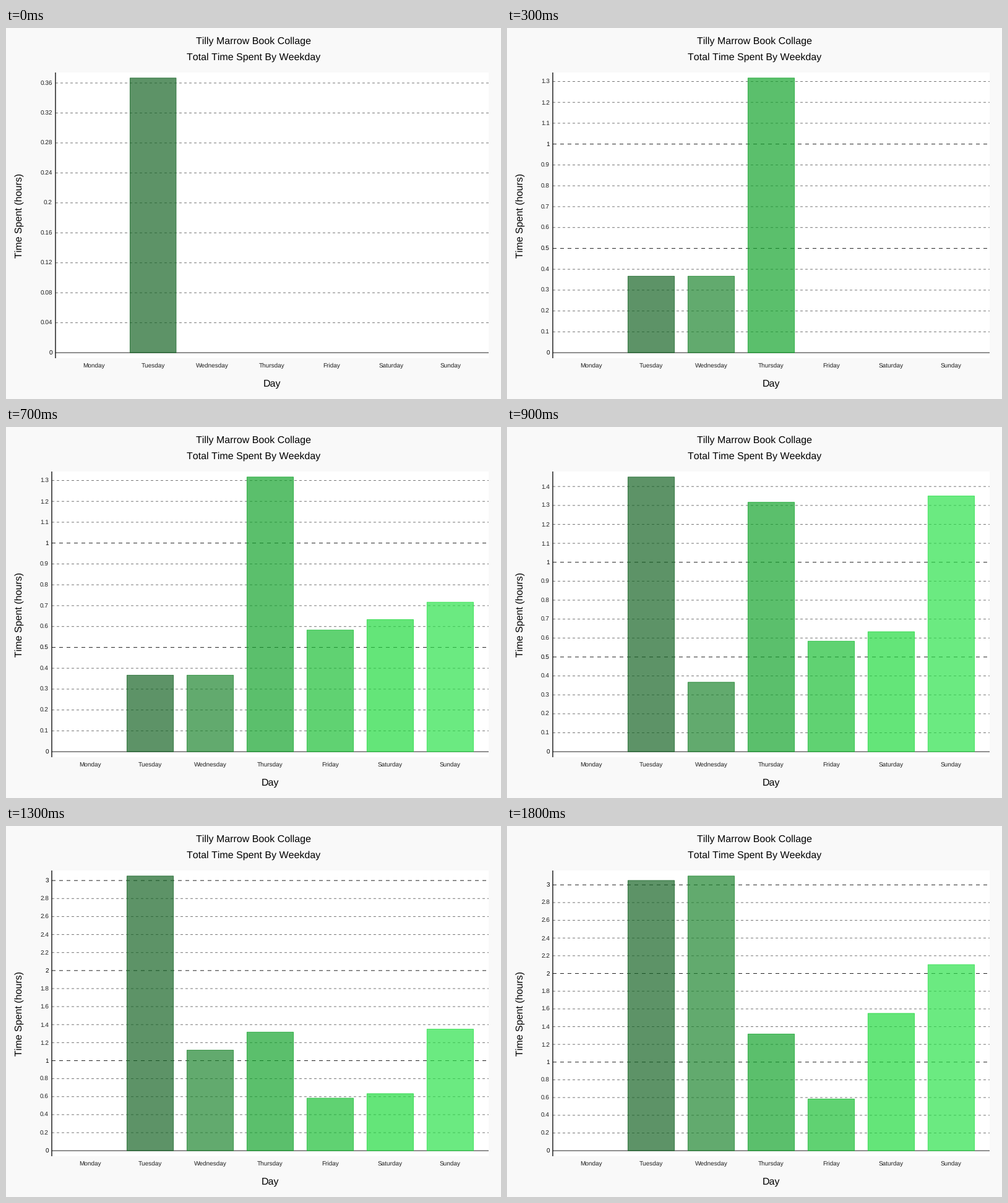
Write a matplotlib script that moves like this. It is 800 by 600 pixels and loops after 3.9 s.

```python
import math

import matplotlib.pyplot as plt
from matplotlib.animation import FuncAnimation
from matplotlib.colors import to_rgba
from matplotlib.patches import Rectangle

W, H, DPI = 800, 600, 100
PX = 72 / DPI
TOP, BOTTOM, RIGHT = 72, 534, 780
MARGIN = 0.02
PAD = MARGIN / (1 + 2 * MARGIN)
INK, SUBTLE, STRONG = (0, 0, 0, 0.87), (0, 0, 0, 0.54), (0, 0, 0, 1)
LOOP_MS, STEP_MS = 3900, 100

DAY_COLORS = {"Monday": "#0f501e", "Tuesday": "#186627",
              "Wednesday": "#1f8630", "Thursday": "#15a52e",
              "Friday": "#1cbf37", "Saturday": "#23da41",
              "Sunday": "#2de24c"}
# Runs of work in order: day, minutes added, equal steps they arrive in
RUNS = [("Tuesday", 22, 1), ("Wednesday", 22, 1), ("Thursday", 79, 2),
        ("Friday", 35, 1), ("Saturday", 38, 1), ("Sunday", 43, 2),
        ("Sunday", 38, 1), ("Tuesday", 65, 1), ("Tuesday", 96, 3),
        ("Wednesday", 45, 1), ("Wednesday", 119, 3), ("Saturday", 55, 1),
        ("Sunday", 45, 1)]

plt.rcParams["font.family"] = "Liberation Sans"
plt.rcParams["text.hinting"] = "none"
plt.rcParams["text.kerning_factor"] = 6  # plain advances, no kerning

fig = plt.figure(figsize=(W / DPI, H / DPI), dpi=DPI, facecolor="#f9f9f9")
ax = fig.add_axes([0, 0, 1, 1])


def hours_after(steps_left):
    hours = dict.fromkeys(DAY_COLORS, 0)
    for day, minutes, steps in RUNS:
        done = max(0, min(steps, steps_left))
        hours[day] += minutes / 60 * done / steps
        steps_left -= steps
    return hours


def tick_step(top):
    order = round(math.log10(top)) - 1
    while top / 10 ** order < 4:
        order -= 1
    step = 10 ** order
    while top / step > 16:
        step *= 2
    return step


def major_step(span):
    step = 10 ** round(math.log10(span))
    if span <= 2 * step:
        return step / 2
    return step * 5 if span >= 5 * step else step


def line(x0, y0, x1, y1, color=INK, dash=None, width=1):
    style = (0, (dash, dash)) if dash else "-"
    ax.plot([x0, x1], [y0, y1], color=color, lw=width * PX, ls=style,
            dash_capstyle="butt", solid_capstyle="butt", snap=False, zorder=1)


def box(x, y, w, h, fill, edge="none", zorder=0):
    ax.add_patch(Rectangle((x, y), w, h, fc=fill, ec=edge, lw=PX,
                           snap=False, zorder=zorder))


def label(x, y, text, size=10, color=INK, ha="center", **style):
    ax.text(x, y, text, fontsize=size * PX, color=color, ha=ha,
            va="baseline", **style)


def title(x, y, text, **style):
    label(x, y, text, 16, STRONG, **style)


def draw(frame):
    ax.clear()
    ax.set(xlim=(0, W), ylim=(H, 0))
    ax.axis("off")

    hours = hours_after(frame + 1)
    top = max(hours.values())
    step = tick_step(top)
    ticks = [round(i * step, 4) for i in range(int(top / step + 1e-9) + 1)]
    major = major_step(ticks[-1])
    names = [f"{t:g}" for t in ticks]

    left = 56 + 6 * max(map(len, names))
    width, height = RIGHT - left, BOTTOM - TOP
    base = BOTTOM - PAD * height
    scale = height * (1 - 2 * PAD) / top
    slot = width * (1 - 2 * PAD) / len(hours)
    bar = slot * 0.88 ** 2

    box(left, TOP, width, height, "white")
    line(left, TOP, left, BOTTOM, width=1.5)
    for tick, name in zip(ticks, names):
        y = base - tick * scale
        strong = abs(tick / major - round(tick / major)) < 1e-6
        dash = None if tick == 0 else 6 if strong else 4
        line(left, y, RIGHT, y, INK if strong else SUBTLE, dash)
        label(left - 5, y + 3.5, name, ha="right",
              color=STRONG if strong else INK)

    for i, (day, value) in enumerate(hours.items()):
        x = left + PAD * width + slot * (i + 0.5)
        label(x, BOTTOM + 15, day)
        if value:
            color = DAY_COLORS[day]
            box(x - bar / 2, base - value * scale, bar, value * scale,
                to_rgba(color, 0.7), to_rgba(color, 0.8), zorder=2)

    title(W / 2, 26, "Tilly Marrow Book Collage")
    title(W / 2, 52, "Total Time Spent By Weekday")
    title(left + width / 2, 580, "Day")
    title(26, TOP + height / 2, "Time Spent (hours)", rotation=90,
          rotation_mode="anchor")
    return []


anim = FuncAnimation(fig, draw, frames=LOOP_MS // STEP_MS, interval=STEP_MS,
                     init_func=lambda: [], repeat=True, repeat_delay=0)
plt.show()
```
